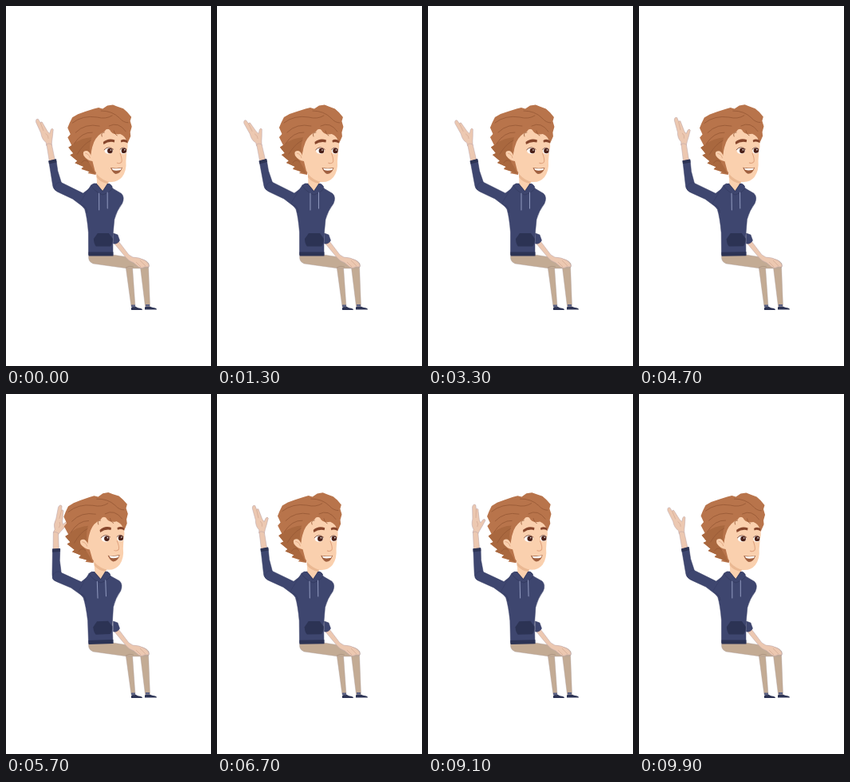
These frames come from a looping animation (257x450 px, 10000 ms). An HTML page:

```html
<!DOCTYPE html>
<html lang="en">
<head>
<meta charset="utf-8">
<title>Waving man</title>
<style>
  html, body { margin: 0; width: 100%; height: 100%; overflow: hidden; background: #fff; }
  svg { display: block; width: 100%; height: 100%; }
  .skin { fill: #fad0ae; }
  .limb { fill: #ecc8b1; stroke: #b9a3a8; stroke-width: .5; }
  .shade { fill: #eab892; }
  .hair { fill: #b8744b; }
  .lowlight { fill: #a9683f; }
  .brow { fill: #87462c; }
  .cloth { fill: #3e466f; stroke: #343b63; stroke-width: .5; }
  .dark { fill: #2c3354; }
  .pants { fill: #c3ab94; stroke: #a99a98; stroke-width: .4; }
  .strand { fill: none; stroke: #965835; stroke-width: .8; stroke-linecap: round; }
  .fold { fill: none; stroke: #2f365a; stroke-width: .6; stroke-linecap: round; }
  .cord { fill: none; stroke: #929bc0; stroke-width: 1; stroke-linecap: round; }
</style>
</head>
<body>
<svg viewBox="0 0 257 450" preserveAspectRatio="none">
  <!-- legs -->
  <path class="dark" d="M157 380v-3q2-2 5-1.500q3 2 7 2.500q2 .500 2 2zM174 379.500v-3q3-2 6-1q3 1.500 7 2q2 .500 2 2z"/>
  <path class="pants" d="M150 325L157 376H162L158.500 326zM168 323L174.500 375.500H180.500L178.500 324Q174 318 168 323z"/>
  <path class="pants" d="M104 311H134L160 315Q176 316 179 322Q181 329 173 328L152 328Q130 325 109 322Q102 319 104 311z"/>
  <path d="M157 373.500h5v2.500h-5zM175 373h5v2.500h-5z" fill="#596083"/>
  <path d="M150 327Q155 324 160 326M168 327Q172 323 177 324" fill="none" stroke="#a78f7c" stroke-width=".7"/>

  <g id="body">
    <!-- waving arm -->
    <g id="forearm">
      <g id="hand">
        <path class="limb" d="M49.500 175L48.500 171Q43 168 41 160L33.500 147Q32.500 142.500 36 143L39 147Q41 144.500 42.500 148L49 157L52 159.500L53 154.500Q54.500 152 56 154L56 162Q55.500 169 56 175z"/>
        <path d="M39 147L44 157M47 160Q51 162 51 166" fill="none" stroke="#cfa48f" stroke-width=".6"/>
      </g>
      <path class="limb" d="M49.500 173L54 196L61 194L56 173Q52 171 49.500 173z"/>
      <path class="cloth" d="M53 194L62 191.500L64.500 206L70 222Q68 231 62 230Q59 228 58.500 223z"/>
      <path class="dark" d="M52.500 193.500L61.800 191L62.800 195L53.400 197.500z"/>
    </g>
    <path class="cloth" stroke="none" d="M109 225L97 234L69 220Q62 220 61 228Q62 231 67 233L84 241L97 251L108 253z"/>

    <!-- neck and torso -->
    <path class="dark" d="M108 224Q112 220.500 121 222Q131 220.500 134 226L122 237z"/>
    <path class="skin" d="M113.500 200L114.500 222.500L121.500 231L127 223L130 213z"/>
    <path class="shade" d="M114 207Q121 218 130 219L128 222Q119 221 114 214z"/>
    <path class="cloth" d="M107 224Q111 220.500 114 222.500L121.500 232L127.500 222.500Q132 221 134 228L145 234.500Q149.500 239 146 247Q139 256 136 267L134 288V311H103.500V283Q102 264 99 254L93 246L103 230z"/>
    <path class="fold" d="M107 224Q111 232 121.500 236Q131 233 134 228M97 249Q102 252 102 258"/>
    <path class="dark" d="M103.500 307.500H134.500V312.500H103.500z"/>
    <path class="dark" d="M115 284H129L134 291Q134 297 131 300.500H113Q110 297 110 291z"/>
    <path class="cord" d="M117 234V255M127.500 233V253"/>

    <!-- head -->
    <path class="hair" d="M113 211L103 209L105 207L95 204L98 201L87 196L90 193.500L81 186L85 184L79 176.500L83 174L78 164L81.500 160L78 152L80.500 146L84 139L91 135L100 132L111 128.500L117 127L122 128.500L128 124.500L135 123.500L140 125.500L148 128.500L153 133L158 139L156.500 144L158.500 151L156.500 158L157 163L153 172L116 197z"/>
    <path class="lowlight" d="M83 174Q95 164 110 164L108 184L100 188L109 203L112 210L95 203L98 201L87 196L90 193.500L81 186L85 184L79 176.500z"/>
    <path class="skin" d="M107 183Q109 166 118 157Q126 150 134 156Q145 160 152 161L153 170Q154 176 152 183L151 194Q152 206 146 214Q139 222 128 219.500Q117 216 112 206L109 194Q102 193 98 187Q96 181 101 181Q105 181 107 187z"/>
    <path d="M100 184Q105 185 106 190" fill="none" stroke="#dca27d" stroke-width=".8"/>
    <path class="hair" d="M106 184Q104 168 112 157L122 148L138 146L154 154L156 162L152 170Q151 163 144 160Q134 162 131 155Q127 152 124 157Q115 161 111 170Q108 177 107 185z"/>
    <path class="strand" d="M84 146Q97 136 115 139Q126 142 134 137M88 158Q100 146 118 150M86 172Q96 157 109 158M90 185Q98 172 107 168M95 196Q99 190 104 195M120 131Q134 131 143 140Q148 146 154 146M130 150Q142 144 151 157M124 158Q119 158 121 163M136 156Q137 161 140 162"/>
    <path class="brow" d="M122.500 170Q129 164.500 137 167.500L136.500 170.500Q130 168.500 123 173zM144.500 168Q149 165.500 153 168.500V171.500Q149 169 145 170.500z"/>
    <g fill="#fff">
      <ellipse cx="129.500" cy="181" rx="5.300" ry="3.900"/>
      <ellipse cx="148" cy="181" rx="4" ry="3.900"/>
    </g>
    <g fill="#4b2119">
      <circle cx="131" cy="181" r="3.300"/>
      <circle cx="148.500" cy="181" r="3.200"/>
    </g>
    <g fill="#fff">
      <circle cx="132" cy="180" r=".8"/>
      <circle cx="149.500" cy="180" r=".8"/>
    </g>
    <path d="M123.500 180Q129 174 135.500 179.500M143.500 179.500Q148 175 152 179.500" fill="none" stroke="#68382a" stroke-width=".8"/>
    <path d="M143.500 184Q146.500 191 145.500 195Q143 198 139.500 196" fill="none" stroke="#dfa27e" stroke-width="1"/>
    <path d="M131.500 202Q139 203.500 146.500 202Q144 210 138 210Q134 208.500 131.500 202z" fill="#a0603f"/>
    <path d="M133 202.700Q139 204 145.500 202.700L144.300 205Q138 206.500 134.500 205z" fill="#fff"/>
  </g>

  <!-- resting arm -->
  <path class="limb" d="M135 296L150 314Q154 319 160 321L166 326Q170 329 174 326L179 326Q180 322 174 318Q167 314 159 314L154 311L141 294z"/>
  <path d="M163 320L169 326M168 318L175 325" fill="none" stroke="#cfa48f" stroke-width=".6"/>
  <path class="cloth" d="M134.500 284L140 286L142.500 293Q140 298 134.500 297z"/>
</svg>
<script>
  const STEP = 100, LOOP = 10000, WAVES = 15;
  // Points of one wave, as fractions of its period
  const LEAVE_LEFT = -0.07, REACH_RIGHT = 0.25, LEAVE_RIGHT = 0.45;
  const part = id => document.getElementById(id);
  const body = part('body'), forearm = part('forearm'), hand = part('hand');

  const turn = (el, angle, x, y) => el.setAttribute('transform', `rotate(${angle} ${x} ${y})`);

  function ease(from, to, value) {
    const u = Math.min(1, Math.max(0, (value - from) / (to - from)));
    return u * u * (3 - 2 * u);
  }

  // 0 is the far left of the wave, 1 the far right
  function swing(time) {
    const turns = time * WAVES / LOOP - LEAVE_LEFT;
    const phase = turns % 1 + LEAVE_LEFT;
    return ease(LEAVE_LEFT, REACH_RIGHT, phase) - ease(LEAVE_RIGHT, 1 + LEAVE_LEFT, phase);
  }

  function draw(time) {
    const s = swing(time);
    turn(body, -2.3 * s, 120, 310);
    turn(forearm, 15.5 * s, 66, 233);
    turn(hand, 33 * s, 53, 174);
  }

  const start = performance.now();
  function tick() {
    const elapsed = (performance.now() - start) % LOOP;
    draw(Math.floor(elapsed / STEP) * STEP);
    requestAnimationFrame(tick);
  }
  tick();
</script>
</body>
</html>
```
